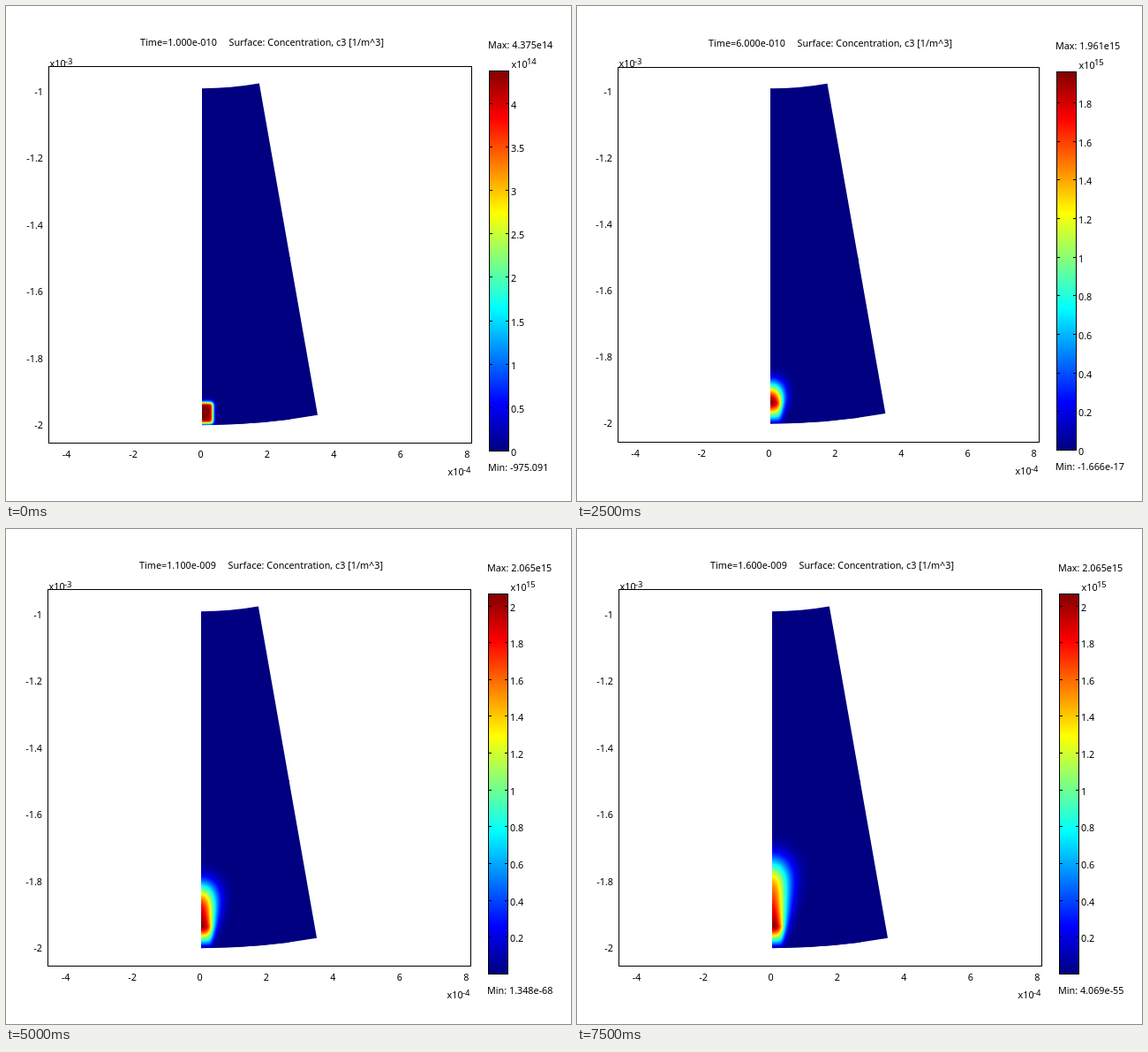
Recreate the animation shown at these times as an HTML page with a canvas. Size 640 px wide and 560 px high, loop 8000 ms.

```html
<!DOCTYPE html>
<html lang="en">
<head>
<meta charset="utf-8">
<title>Concentration plot</title>
<style>
  html, body { margin: 0; width: 640px; height: 560px; overflow: hidden; background: #fff; }
  canvas, svg { position: absolute; left: 0; top: 0; display: block; }
  text { font: 10.8px "Noto Sans", "Open Sans", sans-serif; fill: #000; white-space: pre; }
  .sup { font-size: 9.5px; }
  .line { fill: none; stroke: #000; stroke-width: 1; shape-rendering: crispEdges; }
</style>
</head>
<body>
<canvas id="field" width="640" height="560"></canvas>
<svg id="labels" width="640" height="560"></svg>
<script>
const STEP_MS = 500;

// Plot layouts: the axes shrink when the Min label gets wider.
const wide = {
  left: 48, top: 68, right: 527, bottom: 494, x0: 222, yEnd: 474.3, unit: 377.3,
  bar: 547, barTop: 73, barEnd: 503, title: 152, titleY: 45, zeroX: 220.5
};
const middle = { ...wide, left: 47, right: 526, x0: 221, bar: 546, title: 151, zeroX: 219.5 };
const narrow = {
  left: 46, top: 69, right: 523, bottom: 493, x0: 219, yEnd: 472.5, unit: 375.4,
  bar: 543, barTop: 74, barEnd: 502, title: 149, titleY: 46, zeroX: 217.3
};

// layout, max, exponent, tick step, min label
const steps = [
  [wide, 4.375, 14, 0.5, "-975.091"],
  [wide, 8.531, 14, 1, "-0.00274"],
  [wide, 1.252, 15, 0.2, "-2.314e-7"],
  [narrow, 1.615, 15, 0.2, "-3.022e-11"],
  [narrow, 1.842, 15, 0.2, "-2.481e-14"],
  [narrow, 1.961, 15, 0.2, "-1.666e-17"],
  [narrow, 2.019, 15, 0.2, "-4.127e-26"],
  [narrow, 2.045, 15, 0.2, "-3.258e-37"],
  [narrow, 2.058, 15, 0.2, "-2.703e-48"],
  [narrow, 2.064, 15, 0.2, "-1.875e-60"],
  [middle, 2.065, 15, 0.2, "1.348e-68"],
  [middle, 2.065, 15, 0.2, "2.416e-73"],
  [middle, 2.065, 15, 0.2, "1.062e-76"],
  [middle, 2.065, 15, 0.2, "3.517e-69"],
  [wide, 2.065, 15, 0.2, "8.69e-62"],
  [middle, 2.065, 15, 0.2, "4.069e-55"]
];

const ctx = document.getElementById("field").getContext("2d");
const svg = document.getElementById("labels");

const clamp = v => Math.max(0, Math.min(1, v));
const jet = v => [3, 2, 1].map(k => Math.round(255 * clamp(1.5 - Math.abs(4 * v - k))));

function erf(x) {
  const a = Math.abs(x), t = 1 / (1 + 0.3275911 * a);
  const p = t * (0.254829592 + t * (-0.284496736 + t * (1.421413741 + t * (-1.453152027 + t * 1.061405429))));
  return Math.sign(x) * (1 - p * Math.exp(-a * a));
}
// Box from a to b blurred by a Gaussian
const softBox = (x, a, b, s) => (erf((x - a) / (s * Math.SQRT2)) - erf((x - b) / (s * Math.SQRT2))) / 2;

// Continuous source carried upward by a flow that starts from rest, spreading on the way.
const W = 100, H = 190, SPEED = 5.3, SPREAD = 2.3, PARTS = 40;
const travel = t => SPEED * (t - 1 + Math.exp(-t));

function makePlume(t) {
  const c = new Float32Array(W * H);
  for (let k = 0; k < PARTS; k++) {
    const d = travel(t) - travel(t * (k + 0.5) / PARTS);
    const s = Math.sqrt(1.6 + SPREAD * d);
    const across = Array.from({ length: W }, (_, x) => softBox(x + 0.5, -12.5, 12.5, s));
    for (let y = 0; y < H; y++) {
      const up = H - y - 0.5;
      const along = softBox(up, 0.7 + d, 24.3 + d, s);
      for (let x = 0; x < W; x++) c[y * W + x] += across[x] * along;
    }
  }
  const peak = c.reduce((a, b) => Math.max(a, b), 0);
  const cv = document.createElement("canvas");
  cv.width = W;
  cv.height = H;
  const g = cv.getContext("2d"), img = g.createImageData(W, H);
  c.forEach((v, i) => img.data.set([...jet(v / peak), 255], i * 4));
  g.putImageData(img, 0, 0);
  return cv;
}
const plumes = steps.map((_, i) => makePlume(i + 1));

function drawField(L, plume) {
  const outer = 2 * L.unit, inner = 0.99 * L.unit, cy = L.yEnd - outer;
  const down = Math.PI / 2, edge = down - Math.PI / 18;
  ctx.fillStyle = "#fff";
  ctx.fillRect(0, 0, 640, 560);
  ctx.save();
  ctx.beginPath();
  ctx.arc(L.x0, cy, inner, down, edge, true);
  ctx.arc(L.x0, cy, outer, edge, down);
  ctx.closePath();
  ctx.fillStyle = "#000080";
  ctx.fill();
  ctx.clip();
  ctx.drawImage(plume, L.x0, Math.round(L.yEnd) - H);
  ctx.restore();

  const grad = ctx.createLinearGradient(0, L.barEnd, 0, L.barTop);
  for (const v of [0, 0.125, 0.375, 0.625, 0.875, 1]) grad.addColorStop(v, `rgb(${jet(v)})`);
  ctx.fillStyle = grad;
  ctx.fillRect(L.bar, L.barTop, 23, L.barEnd - L.barTop);
}

const text = (x, y, s, anchor = "start", cls = "") =>
  `<text x="${x}" y="${y}" text-anchor="${anchor}" class="${cls}">${s}</text>`;
const power = (x, y, e, rise) =>
  text(x, y, "x10") + text(x + 17.4, y - rise, e, "start", "sup");
const box = (x, y, r, b) =>
  `<rect class="line" x="${x + 0.5}" y="${y + 0.5}" width="${r - x}" height="${b - y}"/>`;

function labels(i) {
  const [L, max, exp, gap, min] = steps[i];
  const n = i + 1;
  const time = n < 10 ? `${n}.000e-010` : `${(n / 10).toFixed(3)}e-009`;
  let out = box(L.left, L.top, L.right, L.bottom) + box(L.bar, L.barTop, L.bar + 22, L.barEnd);

  out += text(L.title, L.titleY, "Time=" + time);
  out += text(L.title + 100.5, L.titleY, "Surface: Concentration, c3 [1/m^3]");
  out += text(L.bar - 1, L.titleY + 3, `Max: ${max.toFixed(3)}e${exp}`);
  out += text(L.bar - 1, L.barEnd + 23, "Min: " + min);
  out += power(L.left + 1.5, 69, "-3", 3);
  out += power(L.right - 26.5, L.bottom + 37, "-4", 3);
  out += power(L.bar + 25.5, L.barTop - 3, exp, 4);

  for (let k = 0; k < 6; k++)
    out += text(L.left - 6, L.yEnd + 3.7 - (1 - k / 5) * L.unit, -(10 + 2 * k) / 10, "end");
  for (let v = -4; v <= 8; v += 2)
    out += text(L.zeroX + v * L.unit / 10 - (v < 0 ? 1 : 0), L.bottom + 17, v, "middle");

  const first = min[0] === "-" ? 0 : 1;
  for (let k = first; k * gap <= max; k++) {
    const y = L.barEnd - (L.barEnd - L.barTop) * k * gap / max;
    const ty = Math.round(y) + 0.5;
    out += `<path class="line" d="M${L.bar} ${ty}h4m15 0h4"/>`;
    out += text(L.bar + 25, y + 6, +(k * gap).toFixed(1));
  }
  return out;
}

const start = performance.now();
let shown = -1;
function tick() {
  const i = Math.floor((performance.now() - start) / STEP_MS) % steps.length;
  if (i !== shown) {
    shown = i;
    drawField(steps[i][0], plumes[i]);
    svg.innerHTML = labels(i);
  }
  requestAnimationFrame(tick);
}
tick();
</script>
</body>
</html>
```
